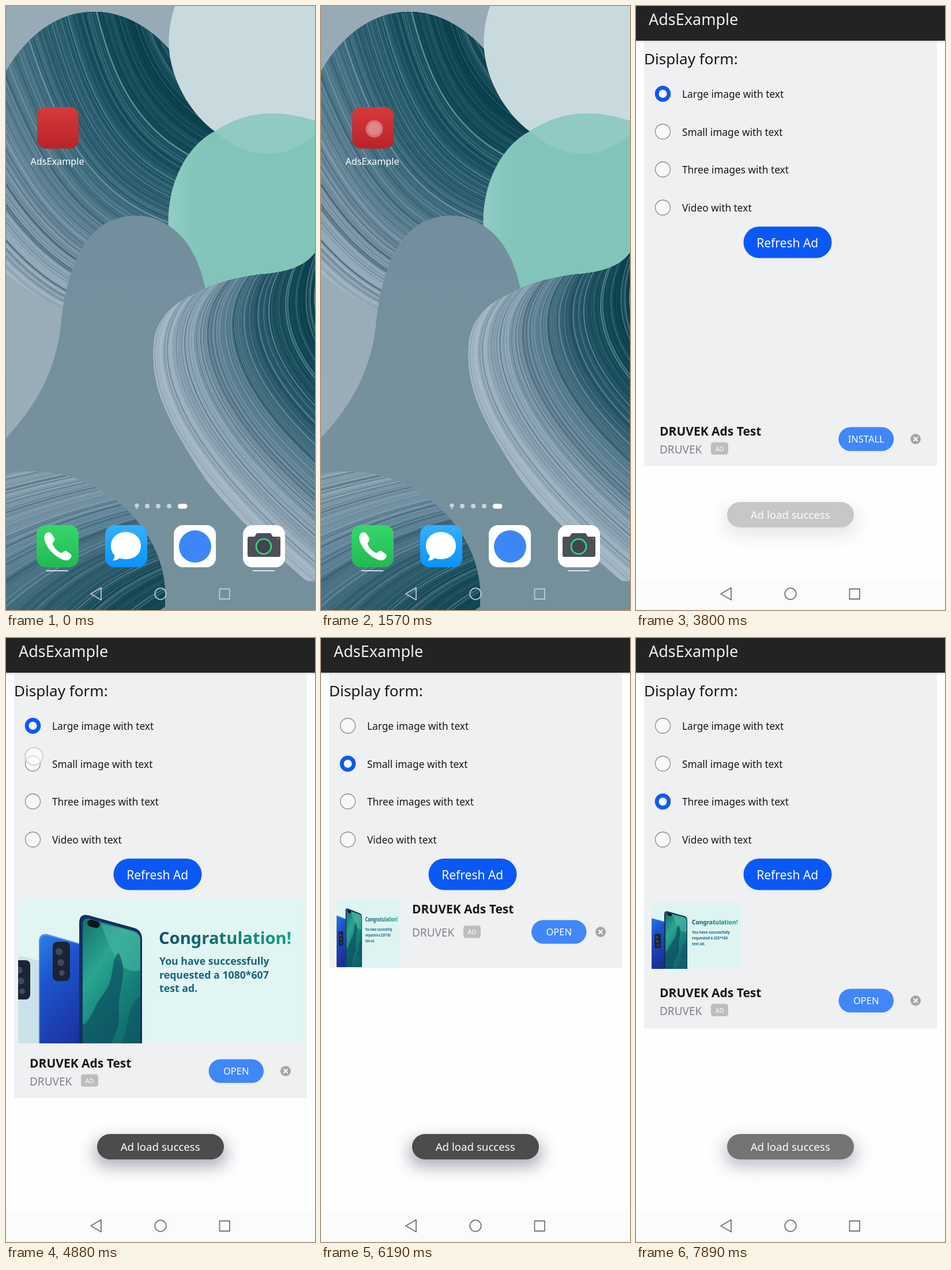
These frames come from a looping animation (536 px wide and 1046 px high, 8000 ms). An HTML page with a canvas:

```html
<!DOCTYPE html>
<html lang="en">
<head>
<meta charset="utf-8">
<title>Ads example</title>
<style>
html, body { margin: 0; height: 100%; overflow: hidden; background: #76909c; }
canvas, body > svg { position: absolute; left: 0; top: 0; width: 100%; height: 100%; display: block; }
text { font-family: "Noto Sans", "Open Sans", sans-serif; fill: #161718; }
.head { font-size: 27px; fill: #efefef; }
.item { font-size: 21.2px; }
.next { font-size: 18.3px; fill: #828282; }
.form { font-size: 26.1px; }
.opt { font-size: 17.3px; }
.mid { text-anchor: middle; }
.btn { font-size: 16.5px; fill: #fff; }
.title { font-size: 21px; font-weight: 600; }
.sub { font-size: 19px; fill: #808285; }
.cong { font-weight: 700; fill: url(#cong); }
.note { font-weight: 600; fill: #17647f; }

.list, .page, .radio, .panel, .touch, .ad, .img, .toast, .install { animation: 8s infinite step-end; }
.list { animation-name: list; }
.page { animation-name: page; animation-timing-function: linear; }
.radio { animation-name: radio; }
.panel { animation-name: panel; }
.toast { animation-name: toast; animation-timing-function: linear; }
.install { animation-name: install; }
.t1 { animation-name: t1; } .t2 { animation-name: t2; }
.t3 { animation-name: t3; } .t4 { animation-name: t4; }
.ad1 { animation-name: ad1; } .ad2 { animation-name: ad2; } .ad3 { animation-name: ad3; }
.img1 { animation-name: img1; animation-timing-function: linear; }
.img2 { animation-name: img2; } .img3 { animation-name: img3; }

@keyframes list { 0% { opacity: 0 } 20.5%, 100% { opacity: 1 } }
@keyframes page { 0%, 34% { opacity: 0 } 35.75%, 100% { opacity: 1 } }
@keyframes radio {
  0% { transform: none } 63.5% { transform: translateY(65.7px) } 88.125%, 100% { transform: translateY(131.3px) }
}
@keyframes panel { 0% { height: 737px } 63.5% { height: 512px } 88.125%, 100% { height: 616px } }
@keyframes t1 { 0% { opacity: 0 } 18.7% { opacity: 1 } 20.5%, 100% { opacity: 0 } }
@keyframes t2 { 0% { opacity: 0 } 30.5% { opacity: 1 } 33.1%, 100% { opacity: 0 } }
@keyframes t3 { 0% { opacity: 0 } 60.9% { opacity: 1 } 62.75%, 100% { opacity: 0 } }
@keyframes t4 { 0% { opacity: 0 } 85.5% { opacity: 1 } 87.375%, 100% { opacity: 0 } }
@keyframes ad1 { 0% { opacity: 0 } 44% { opacity: 1 } 63.5%, 100% { opacity: 0 } }
@keyframes ad2 { 0% { opacity: 0 } 71.25% { opacity: 1 } 88.125%, 100% { opacity: 0 } }
@keyframes ad3 { 0% { opacity: 0 } 95.8%, 100% { opacity: 1 } }
@keyframes img1 { 0%, 53.6% { opacity: 0 } 56%, 100% { opacity: 1 } }
@keyframes img2 { 0% { opacity: 0 } 73.5%, 100% { opacity: 1 } }
@keyframes img3 { 0% { opacity: 0 } 97.7%, 100% { opacity: 1 } }
@keyframes install { 0% { opacity: 1 } 49.25%, 100% { opacity: 0 } }
@keyframes toast {
  0%, 46.75% { opacity: 0 } 49.25%, 66.6% { opacity: 1 } 69.1%, 72.1% { opacity: 0 }
  74.6%, 90% { opacity: 1 } 92.5%, 96.7% { opacity: 0 } 99.2%, 100% { opacity: 1 }
}
</style>
</head>
<body>
<canvas id="wall" width="536" height="1046"></canvas>
<svg viewBox="0 0 536 1046" preserveAspectRatio="none">
  <defs>
    <linearGradient id="red" x2="0" y2="1"><stop stop-color="#d63a3b"/><stop offset="1" stop-color="#b82329"/></linearGradient>
    <linearGradient id="green" x2="0" y2="1"><stop stop-color="#34d768"/><stop offset="1" stop-color="#22b956"/></linearGradient>
    <linearGradient id="sky" x2="0" y2="1"><stop stop-color="#33b0ff"/><stop offset="1" stop-color="#0a93fb"/></linearGradient>
    <linearGradient id="shade" x2="0" y2="1"><stop stop-color="#c4c4c6"/><stop offset="1" stop-color="#f0f1f3" stop-opacity="0"/></linearGradient>
    <linearGradient id="cong"><stop stop-color="#0f4d72"/><stop offset=".5" stop-color="#12796f"/><stop offset="1" stop-color="#12a08e"/></linearGradient>
    <linearGradient id="back" x2=".3" y2="1"><stop stop-color="#2f7fe0"/><stop offset=".35" stop-color="#1c55cf"/><stop offset="1" stop-color="#1c2f96"/></linearGradient>
    <linearGradient id="screen" x2=".5" y2="1"><stop stop-color="#14706c"/><stop offset=".35" stop-color="#2aa58f"/><stop offset=".65" stop-color="#168279"/><stop offset="1" stop-color="#10606a"/></linearGradient>
    <filter id="blur" x="-30%" y="-100%" width="160%" height="300%"><feGaussianBlur stdDeviation="14"/></filter>

    <g id="nav" fill="none" stroke="currentColor" stroke-width="1.8" stroke-linejoin="round">
      <path d="M147 1018L165 1007.5V1028.5Z"/><circle cx="268" cy="1018" r="9.8"/><rect x="370.5" y="1009.5" width="17.5" height="17.5"/>
    </g>
    <g id="chrome">
      <rect y="60" width="536" height="4" fill="url(#shade)"/>
      <rect width="536" height="60" fill="#242324"/>
      <text class="head" x="22" y="33">AdsExample</text>
      <rect y="990" width="536" height="56" fill="#fbfbfc"/>
      <use href="#nav" color="#747474"/>
    </g>
    <g id="card">
      <rect x="27" y="73.5" width="482" height="87.5" rx="16" fill="#fff"/>
      <text class="next" x="427.5" y="125">next</text>
      <path d="M475 107L483.5 118.5L475 130.5" fill="none" stroke="#adadad" stroke-width="4" stroke-linecap="round" stroke-linejoin="round"/>
    </g>
    <circle id="ring" cx="46.5" r="13" fill="#f7f8f9" stroke="#8b8c8e" stroke-width="1.3"/>
    <circle id="tap" r="15.3" fill="#fff" fill-opacity=".62" stroke="#cfcfd6" stroke-width="2"/>

    <text id="title" class="title">DRUVEK Ads Test</text>
    <g id="sub">
      <text class="sub">DRUVEK</text>
      <rect x="89" y="-19" width="30" height="21.5" rx="4.5" fill="#bcbdbe"/>
      <text class="mid" x="104" y="-4" font-size="11" style="fill:#fff">AD</text>
    </g>
    <g id="open">
      <rect width="95.5" height="41" rx="20.5" fill="#4087f9"/>
      <text class="btn mid" x="47.7" y="26.5">OPEN</text>
    </g>
    <g id="close">
      <circle r="9" fill="#a4a5a7"/><path d="M-3.5-3.5L3.5 3.5M3.5-3.5L-3.5 3.5" stroke="#fff" stroke-width="2"/>
    </g>

    <g id="phones">
      <path d="M15 760V556Q20 550 30 552L57 559V760Z" fill="#cbe2ea"/>
      <path d="M57 760V526Q57 511 72 513L128 529V760Z" fill="url(#back)"/>
      <path d="M58 760V526Q58 513 72 514.5L128 530" fill="none" stroke="#5a9cec" stroke-width="1.5"/>
      <path d="M127 760V494Q127 477 142 480L222 502Q236 506 236 522V760Z" fill="#12305f"/>
      <path d="M133 760V497Q133 484 144 486L220 507Q233 511 233 524V760Z" fill="url(#screen)"/>
      <path d="M165 495L220 508Q233 511 233 524V575C205 585 185 555 165 495Z" fill="#48b8a6" opacity=".6"/>
      <path d="M195 545C180 560 190 590 170 615S150 660 133 670V760H170C160 720 200 690 196 650S215 580 195 545Z" fill="#0b4a5e" opacity=".65"/>
      <path d="M233 620C205 640 215 680 200 702H233Z" fill="#0d5360" opacity=".5"/>
      <rect x="141" y="489" width="22" height="12" rx="6" fill="#0a1420" transform="rotate(14 152 495)"/>
    </g>
    <g id="cam">
      <rect x="81" y="526" width="30" height="68" rx="8" fill="#1b2433"/>
      <circle cx="92" cy="543" r="6" fill="#3d4a5e"/><circle cx="95" cy="562" r="6" fill="#3d4a5e"/><circle cx="97" cy="580" r="5" fill="#3d4a5e"/>
    </g>
    <svg id="small" x="27" y="458" width="156" height="115" viewBox="27 458 156 115">
      <rect x="27" y="458" width="156" height="115" fill="#def4f2"/>
      <use href="#phones" transform="matrix(.367 0 0 .367 2.4 297.2)"/>
      <use href="#cam" transform="matrix(.367 0 0 .367 2.4 319.2)"/>
      <text class="cong" x="97" y="496" font-size="10.1">Congratulation!</text>
      <g font-size="6.1"><text class="note" x="97" y="511.5">You have successfully</text><text class="note" x="97" y="521.5">requested a 225*150</text><text class="note" x="97" y="531.5">test ad.</text></g>
    </svg>
  </defs>

  <g id="home">
    <g fill="#fff">
      <g opacity=".62"><circle cx="227" cy="865" r="3.6"/><path d="M225 869.5h4v1.5h-4z"/><circle cx="245" cy="866" r="4"/><circle cx="264" cy="866" r="4"/><circle cx="283" cy="866" r="4"/></g>
      <rect x="298" y="862" width="16.5" height="8.5" rx="4.2"/>
    </g>
    <rect x="54" y="175" width="72" height="72" rx="15" fill="url(#red)"/>
    <text class="mid" x="89" y="274.5" font-size="16.2" style="fill:#fff">AdsExample</text>
    <rect x="53" y="899" width="73" height="73" rx="16" fill="url(#green)"/>
    <path d="M67 916C70 911 76 910 79 914L84 922C86 926 80 929 81 932C84 939 89 944 95 947C98 948 101 942 105 944L112 949C116 952 112 958 107 960C92 962 62 935 67 916Z" fill="#fff"/>
    <rect x="172" y="899" width="73" height="73" rx="16" fill="url(#sky)"/>
    <path d="M208 911C223 911 234 921 234 935S223 958 208 958C204 958 200 957 197 956C193 960 188 961 185 960C188 957 189 954 188 951C184 947 182 941 182 935C182 921 193 911 208 911Z" fill="#fff"/>
    <rect x="291" y="899" width="73" height="73" rx="16" fill="#fff"/>
    <circle cx="328" cy="936" r="28" fill="#3d86f7"/>
    <rect x="411" y="899" width="73" height="73" rx="16" fill="#fff"/>
    <path d="M421 919H431L435 913H459L463 919H474Q476 919 476 922V951Q476 954 473 954H422Q419 954 419 951V922Q419 919 421 919Z" fill="#4a5158"/>
    <circle cx="447" cy="936" r="13" fill="#3f464d" stroke="#37d583" stroke-width="2.6"/>
    <circle cx="472" cy="922.5" r="1.8" fill="#d2474f"/>
    <g fill="#fff" opacity=".75"><rect x="70" y="977" width="38" height="2"/><rect x="428" y="977" width="38" height="2"/></g>
    <use href="#nav" color="#c0c9cf"/>
    <g class="touch t1"><circle cx="92.5" cy="213" r="15" fill="#fff" opacity=".33"/><circle cx="92.5" cy="213" r="11" fill="#fff" opacity=".15"/></g>
  </g>

  <g class="list">
    <rect width="536" height="1046" fill="#eff0f2"/>
    <use href="#chrome"/>
    <use href="#card"/><use href="#card" y="101.3"/><use href="#card" y="202.6"/><use href="#card" y="304"/>
    <g class="item">
      <text x="43" y="126">Native Ad</text><text x="43" y="227">Banner Ad</text>
      <text x="43" y="328.5">Reward Ad</text><text x="43" y="430">Interstitial Ad</text>
    </g>
    <use class="touch t2" href="#tap" x="481" y="129"/>
  </g>

  <g class="page">
    <rect width="536" height="1046" fill="#fefefe"/>
    <rect class="panel" x="14" y="60" width="508" height="737" fill="#eff0f2"/>
    <use href="#chrome"/>
    <text class="form" x="14" y="100.5">Display form:</text>
    <use href="#ring" y="152"/><use href="#ring" y="217.5"/><use href="#ring" y="283"/><use href="#ring" y="349"/>
    <g class="radio"><circle cx="46.5" cy="152" r="13.7" fill="#0a59f7"/><circle cx="46.5" cy="152" r="7" fill="#fff"/></g>
    <g class="opt">
      <text x="80" y="158.5">Large image with text</text><text x="80" y="224.5">Small image with text</text>
      <text x="80" y="290">Three images with text</text><text x="80" y="356">Video with text</text>
    </g>
    <rect x="186.5" y="382" width="153" height="54.5" rx="27.2" fill="#0a59f7"/>
    <text class="mid" x="262.7" y="417.5" font-size="21" font-weight="500" style="fill:#fff">Refresh Ad</text>

    <g class="ad ad1">
      <g class="img img1">
        <svg x="21" y="451" width="495" height="251" viewBox="21 451 495 251">
          <rect x="21" y="451" width="495" height="251" fill="#e1f5f2"/>
          <use href="#phones"/><use href="#cam"/><use href="#cam" x="-69" y="32"/>
          <text class="cong" x="265" y="530" font-size="29.2">Congratulation!</text>
          <g font-size="17.7"><text class="note" x="266" y="566">You have successfully</text><text class="note" x="266" y="589.5">requested a 1080*607</text><text class="note" x="266" y="613">test ad.</text></g>
        </svg>
      </g>
      <use href="#title" x="41" y="744"/><use href="#sub" x="41" y="774.5"/>
      <use href="#open" x="351.5" y="729.5"/><use href="#close" x="485" y="750"/>
      <g class="install">
        <rect x="351.5" y="729.5" width="95.5" height="41" rx="20.5" fill="#4087f9"/>
        <text class="btn mid" x="399.2" y="756">INSTALL</text>
      </g>
    </g>

    <g class="ad ad2">
      <g class="img img2"><use href="#small" transform="matrix(.711 0 0 1.009 7.8 -9.1)"/></g>
      <use href="#title" x="158" y="477"/><use href="#sub" x="158" y="517"/>
      <use href="#open" x="365" y="488.5"/><use href="#close" x="485" y="509"/>
    </g>

    <g class="ad ad3">
      <g class="img img3"><use href="#small"/></g>
      <use href="#title" x="41" y="622"/><use href="#sub" x="41" y="652.5"/>
      <use href="#open" x="351.5" y="607.5"/><use href="#close" x="485" y="628"/>
    </g>

    <g class="toast">
      <rect x="152" y="868" width="232" height="48" rx="24" fill="#5c6478" opacity=".5" filter="url(#blur)"/>
      <rect x="158" y="859" width="220" height="44" rx="22" fill="#4c4c4c"/>
      <text class="mid" x="267.7" y="888" font-size="18.7" font-weight="500" style="fill:#fff">Ad load success</text>
    </g>
    <use class="touch t3" href="#tap" x="48.5" y="205"/>
    <use class="touch t4" href="#tap" x="49.5" y="277"/>
  </g>
</svg>

<script>
const ctx = document.getElementById('wall').getContext('2d');
let seed = 4211;
const rnd = () => (seed = seed * 16807 % 2147483647) / 2147483647;
const rgb = h => [1, 3, 5].map(i => parseInt(h.slice(i, i + 2), 16));
const mix = (a, b, t) => a.map((v, i) => v + (b[i] - v) * t);

function fill(d, color) {
  ctx.fillStyle = color;
  ctx.fill(new Path2D(d));
}

function fade(x0, y0, x1, y1, ...colors) {
  const g = ctx.createLinearGradient(x0, y0, x1, y1);
  colors.forEach((c, i) => g.addColorStop(i / (colors.length - 1), c));
  return g;
}

function tone(stops, u) {
  const p = Math.min(u, 0.9999) * (stops.length - 1), i = Math.floor(p);
  return mix(rgb(stops[i]), rgb(stops[i + 1]), p - i);
}

// Brushed blob: a smooth base of wide strokes, then fine random strands.
function brush(d, stops, count, first, last) {
  const stroke = (u, width, color, alpha) => {
    const [x, y, ...c] = mix(first, last, u);
    ctx.beginPath();
    ctx.moveTo(x, y);
    ctx.bezierCurveTo(...c);
    ctx.lineWidth = width;
    ctx.strokeStyle = `rgba(${color.map(Math.round)},${alpha})`;
    ctx.stroke();
  };
  ctx.save();
  ctx.clip(new Path2D(d));
  for (let i = 0; i <= 200; i++) stroke(i / 200, 12, tone(stops, i / 200), 1);
  for (let i = 0; i < count; i++) {
    const u = rnd(), light = rnd() < 0.5, k = rnd() ** 2 * 0.7;
    const goal = light ? [176, 208, 220] : [6, 50, 66];
    stroke(u, 0.5 + rnd(), mix(tone(stops, u), goal, k), 0.75);
  }
  ctx.restore();
}

ctx.fillStyle = fade(0, 0, 0, 750, '#98aab6', '#9badb8');
ctx.fillRect(0, 0, 536, 1046);

brush('M0 113C40 45 95 10 152 10C205 10 250 38 283 75L362 217L300 420L130 540L105 527C65 510 25 485 0 462Z',
  ['#134b58', '#0d424f', '#1d5463', '#406d7f', '#7891a3', '#a8b8c6'], 600,
  [270, -250, 278, -40, 290, 90, 481, 163], [-160, 250, -60, 430, 40, 520, 130, 545]);

fill('M293 0C283 30 280 60 284 85C292 140 325 190 362 217C395 245 425 256 455 256C490 256 515 240 536 222V0Z', '#c8dade');

const mint = 'M282 385C278 310 312 243 362 217C395 195 430 186 460 186C490 186 515 192 536 199V500H340Z';
fill(mint, fade(281, 0, 350, 0, '#92cdc5', '#86c7bd', '#82c4ba'));
ctx.save();
ctx.clip(new Path2D(mint));
fill('M362 217C395 245 425 256 455 256C490 256 515 240 536 222V180H362Z', 'rgba(166,211,204,.4)');
ctx.restore();

fill('M0 748C45 700 85 640 95 555C103 470 125 405 175 375C210 358 250 358 283 381C320 405 338 450 346 490L536 480V1046H0Z',
  fade(0, 362, 0, 1046, '#738f9e', '#76919d', '#74909b'));

brush('M536 428C515 455 480 462 440 465C390 472 355 482 325 500C280 520 258 550 256 590C253 650 270 690 300 745C340 815 400 900 445 950C480 985 510 997 536 996Z',
  ['#a7b7c5', '#96aaba', '#7891a3', '#4a7284', '#28596a', '#0f4654', '#0c404d'], 600,
  [320, 490, 208, 560, 215, 740, 560, 1020], [550, 415, 515, 490, 525, 560, 565, 610]);

brush('M0 810C30 804 80 804 120 818C210 850 275 930 276 1020V1046H0Z',
  ['#8fa4b1', '#8199a8', '#64869a', '#3d6879', '#1d4f5e', '#124552'], 360,
  [-200, 850, -80, 820, 40, 790, 160, 775], [150, 1200, 180, 1110, 230, 1050, 320, 1010]);
</script>
</body>
</html>
```
